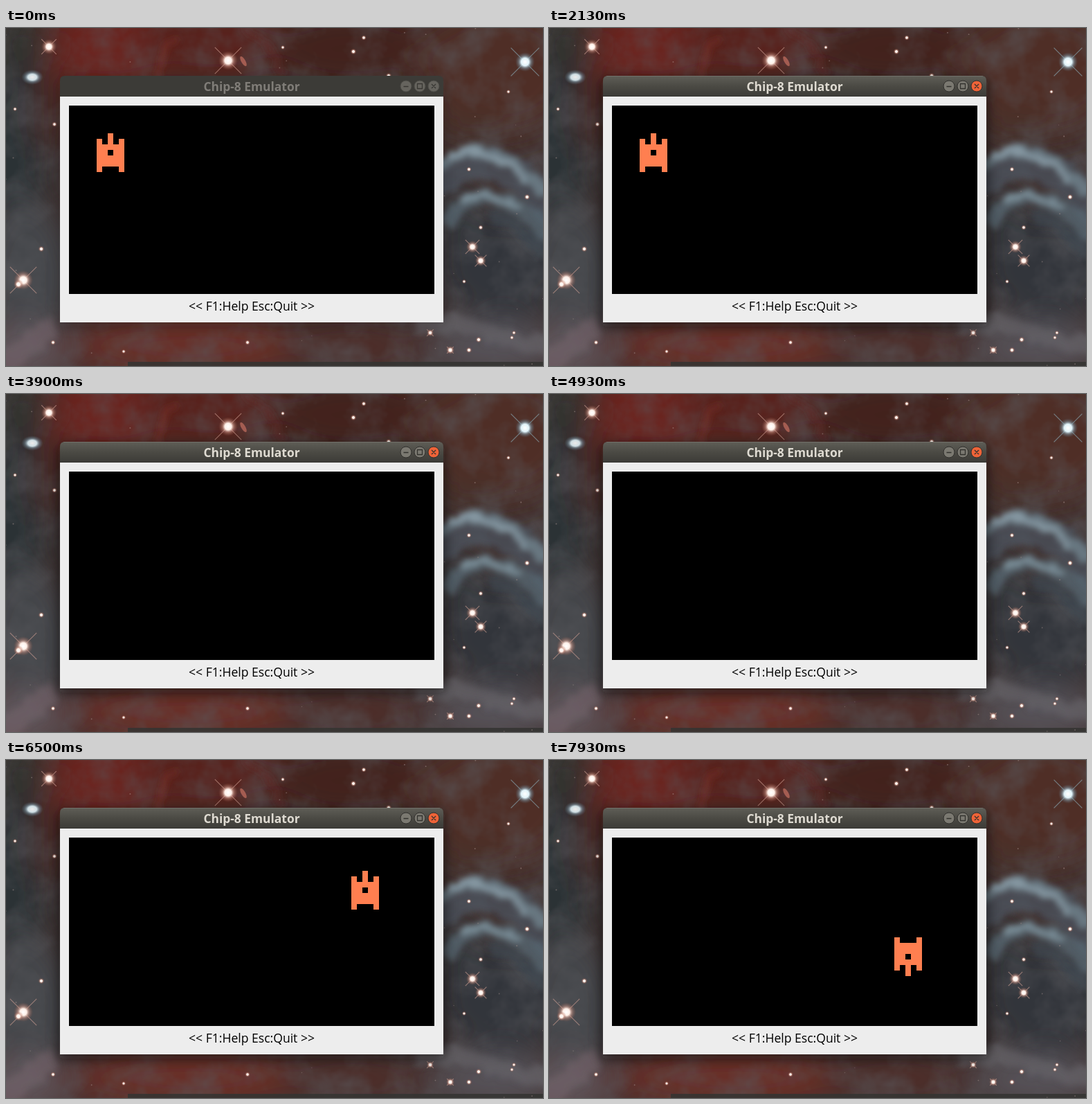
These frames come from a looping animation (776 px wide and 488 px high, 8 s). An HTML page:

```html
<!DOCTYPE html>
<html lang="en">
<head>
<meta charset="utf-8">
<title>Chip-8 Emulator</title>
<style>
html, body { margin: 0; width: 100%; height: 100%; overflow: hidden; background: #3a2c2a; }
svg { position: absolute; left: 0; top: 0; width: 776px; height: 488px; }
#sky { will-change: transform; }
text { font-family: "Open Sans", "Noto Sans", sans-serif; text-anchor: middle; }
</style>
</head>
<body>
<svg id="sky" viewBox="0 0 776 488">
  <defs>
    <filter id="soft" x="-50%" y="-50%" width="200%" height="200%"><feGaussianBlur stdDeviation="24"/></filter>
    <filter id="wisp" x="-30%" y="-30%" width="160%" height="160%">
      <feTurbulence type="fractalNoise" baseFrequency=".05" numOctaves="3" seed="4"/>
      <feDisplacementMap in="SourceGraphic" scale="20" xChannelSelector="R" yChannelSelector="G"/>
      <feGaussianBlur stdDeviation="4"/>
    </filter>
    <filter id="mist" x="0" y="0" width="100%" height="100%">
      <feTurbulence type="fractalNoise" baseFrequency=".018" numOctaves="4" seed="9"/>
      <feColorMatrix values="0 0 0 0 .1  0 0 0 0 .1  0 0 0 0 .11  0 1.2 0 0 -.48"/>
    </filter>
    <radialGradient id="glow">
      <stop offset="0" stop-color="#fff"/>
      <stop offset=".35" stop-color="#fff0e8"/>
      <stop offset=".6" stop-color="#d8a090" stop-opacity=".5"/>
      <stop offset="1" stop-color="#985848" stop-opacity="0"/>
    </radialGradient>
    <radialGradient id="cool">
      <stop offset="0" stop-color="#fff"/>
      <stop offset=".4" stop-color="#e0f2f8"/>
      <stop offset=".65" stop-color="#88a8b8" stop-opacity=".5"/>
      <stop offset="1" stop-color="#587080" stop-opacity="0"/>
    </radialGradient>
  </defs>
  <rect width="776" height="488" fill="#40302e"/>
  <g id="clouds" filter="url(#soft)"></g>
  <rect width="776" height="488" filter="url(#mist)"/>
  <g filter="url(#wisp)" fill="none" stroke-linecap="round">
    <path d="M620 225Q665 178 715 200T785 260" stroke="#4c5660" stroke-width="48" opacity=".7"/>
    <path d="M630 196Q668 167 710 186T775 236" stroke="#71828e" stroke-width="17" opacity=".8"/>
    <path d="M636 186Q672 170 708 188T752 216" stroke="#93a7b2" stroke-width="6" opacity=".7"/>
    <path d="M642 274Q672 230 720 250T776 294" stroke="#586a74" stroke-width="22" opacity=".75"/>
    <path d="M660 246Q698 236 738 258" stroke="#849aa4" stroke-width="9" opacity=".75"/>
    <path d="M705 270Q738 278 772 320" stroke="#424c56" stroke-width="20" opacity=".6"/>
    <path d="M600 428Q665 424 705 442T790 458" stroke="#6a666c" stroke-width="26" opacity=".55"/>
    <path d="M-10 486Q30 462 58 436" stroke="#74656a" stroke-width="32" opacity=".6"/>
    <path d="M222 70Q226 34 244 16" stroke="#7c3428" stroke-width="9" opacity=".5"/>
    <path d="M345 0Q385 20 398 68" stroke="#64302a" stroke-width="9" opacity=".45"/>
  </g>
  <rect x="176" y="482" width="600" height="6" fill="#343432" opacity=".85"/>
  <g id="stars"></g>
</svg>

<svg id="app" viewBox="0 0 776 488">
  <defs>
    <linearGradient id="bar" x2="0" y2="1">
      <stop offset="0" stop-color="#5f5e57"/>
      <stop offset=".5" stop-color="#4b4a44"/>
      <stop offset="1" stop-color="#3c3b37"/>
    </linearGradient>
    <filter id="shade" x="-20%" y="-20%" width="140%" height="140%"><feGaussianBlur stdDeviation="9"/></filter>
  </defs>
  <rect id="shadow" x="76" y="74" width="558" height="357" rx="6" fill="#080808" filter="url(#shade)"/>
  <path id="title" d="M78 99V76q0-7 7-7H625q7 0 7 7V99Z"/>
  <path id="shine" d="M83 69.5H627" stroke="#7d7b74"/>
  <text id="name" x="355" y="91" font-size="17.4" font-weight="700">Chip-8 Emulator</text>
  <g id="buttons" stroke-width="1"></g>
  <g id="glyphs" fill="none" stroke-width="1.3">
    <path d="M574.500 84.500h7M594.500 80.500h7v7h-7zM615 81l6 6m0-6l-6 6"/>
  </g>
  <rect x="78" y="99" width="554" height="326" fill="#ededed"/>
  <rect x="91" y="112" width="528" height="272"/>
  <path id="tank" fill="#ff7f50" shape-rendering="crispEdges"/>
  <text x="355" y="408" font-size="17.57">&lt;&lt; F1:Help Esc:Quit &gt;&gt;</text>
</svg>

<script>
const NS = "http://www.w3.org/2000/svg";
const $ = id => document.getElementById(id);
const add = (parent, tag, attrs) => {
  const el = parent.appendChild(document.createElementNS(NS, tag));
  set(el, attrs);
  return el;
};
function set(el, attrs) {
  for (const k in attrs) el.setAttribute(k, attrs[k]);
}

// Nebula
function cloud(cx, cy, rx, ry, fill) {
  add($("clouds"), "ellipse", { cx, cy, rx, ry, fill });
}
cloud(150, 25, 110, 65, "#6c241a");
cloud(300, 20, 110, 60, "#58241e");
cloud(20, 20, 50, 50, "#33302f");
cloud(500, 30, 120, 60, "#43241f");
cloud(710, 60, 120, 100, "#502e28");
cloud(10, 170, 55, 120, "#2c3135");
cloud(65, 120, 25, 60, "#4a2822");
cloud(30, 360, 70, 110, "#44474c");
cloud(20, 470, 70, 40, "#645358");
cloud(270, 460, 180, 45, "#6b2f25");
cloud(500, 460, 110, 40, "#4e2f2b");
cloud(670, 140, 50, 24, "#48302c");
cloud(720, 345, 100, 80, "#33363b");
cloud(650, 270, 25, 50, "#363b41");
cloud(710, 462, 100, 36, "#58555c");

// Stars: diagonal spikes on the bright ones
function star(x, y, r, spike = 0, fill = "glow") {
  const g = add($("stars"), "g", { transform: `translate(${x} ${y})` });
  if (spike) {
    const a = spike * .6;
    add(g, "path", {
      d: `M${-a} ${-a}L${a} ${a}M${a} ${-a}L${-a} ${a}`,
      stroke: fill === "cool" ? "#8fb4c0" : "#d0a094", "stroke-width": 1.2, opacity: .6
    });
  }
  add(g, "circle", { r, fill: `url(#${fill})` });
}
star(321, 47, 14, 32);
star(750, 49, 14, 34, "cool");
star(62, 27, 11, 18);
star(25, 364, 14, 32);
star(18, 370, 7);
star(674, 316, 9, 17);
star(686, 336, 8, 14);
star(613, 440, 5, 8);
star(642, 465, 6, 8);
add($("stars"), "ellipse", { cx: 38, cy: 71, rx: 16, ry: 11, fill: "url(#cool)", opacity: .9 });
add($("stars"), "ellipse", {
  cx: 343, cy: 48, rx: 3, ry: 8, fill: "#b8685a", opacity: .8, transform: "rotate(-30 343 48)"
});
[[400, 28], [517, 14], [502, 34], [13, 117], [70, 139], [51, 319], [170, 467], [349, 454],
 [753, 244], [662, 366], [669, 204], [669, 465], [726, 92], [686, 288], [683, 450], [731, 447],
 [68, 454], [553, 69], [734, 440]].forEach(([x, y], i) => star(x, y, 3.2 + i % 3 * .6));
let seed = 11;
const rnd = () => (seed = seed * 16807 % 2147483647) / 2147483647;
for (let i = 0; i < 60; i++) {
  add($("stars"), "circle", {
    cx: rnd() * 776, cy: rnd() * 488, r: .5 + rnd() * .6, fill: "#a89490", opacity: .5
  });
}

// Window decoration
const buttons = [578, 598, 618].map(cx => add($("buttons"), "circle", { cx, cy: 84, r: 8 }));
function focus(on) {
  set($("title"), { fill: on ? "url(#bar)" : "#3c3b37" });
  set($("shine"), { opacity: on ? .6 : 0 });
  set($("shadow"), { opacity: on ? .6 : .2 });
  set($("name"), { fill: on ? "#dfdbd2" : "#807d78" });
  set($("buttons"), { stroke: on ? "#31302d" : "#4e4d48" });
  set($("glyphs"), { stroke: on ? "#33322e" : "#383733" });
  buttons.forEach((b, i) => set(b, { fill: !on ? "#66645e" : i < 2 ? "#7b7971" : "#ee6338" }));
}

// Tank sprite, turned about its centre, and its drive: [facing, cells]
const CELL = 8;
const ROWS = ["..#..", "#.#.#", "#####", "##.##", "#####", "#####", "#...#"];
const FACING = {
  up: { turn: (c, r) => [c, r], dx: 0, dy: -1 },
  down: { turn: (c, r) => [c, 6 - r], dx: 0, dy: 1 },
  right: { turn: (c, r) => [5 - r, c + 1], dx: 1, dy: 0 }
};
const DRIVE = [["right", 46], ["down", 11], ["up", 15], ["down", 17]];
const TOTAL = DRIVE.reduce((sum, [, cells]) => sum + cells, 0);

function sprite(x, y, turn) {
  let d = "";
  ROWS.forEach((row, r) => [...row].forEach((p, c) => {
    if (p !== "#") return;
    const [i, j] = turn(c, r);
    d += `M${91 + (x + i) * CELL} ${112 + (y + j) * CELL}h8v8h-8z`;
  }));
  return d;
}

function tankAt(u) {
  let x = 5, y = 5, face = "up", left = Math.floor(u);
  for (const [dir, cells] of DRIVE) {
    if (left <= 0) break;
    const n = Math.min(left, cells);
    face = dir;
    x += FACING[dir].dx * n;
    y += FACING[dir].dy * n;
    left -= n;
  }
  return sprite(x, y, FACING[face].turn);
}

const LOOP = 8000, TICK = 100 / 3, START = 78.68, PACE = 1.72;
let last = -1;

function render(t) {
  const tick = Math.floor((t + 4) / TICK);
  if (tick === last) return;
  last = tick;
  focus(t >= 400);
  // While driving, each step erases the tank and draws it again
  const u = (tick - START) / PACE;
  const erased = u > 0 && u < TOTAL && u % 1 < .45;
  set($("tank"), { d: erased ? "" : tankAt(u) });
}

const begin = performance.now();
function loop() {
  render((performance.now() - begin) % LOOP);
  requestAnimationFrame(loop);
}
loop();
</script>
</body>
</html>
```
